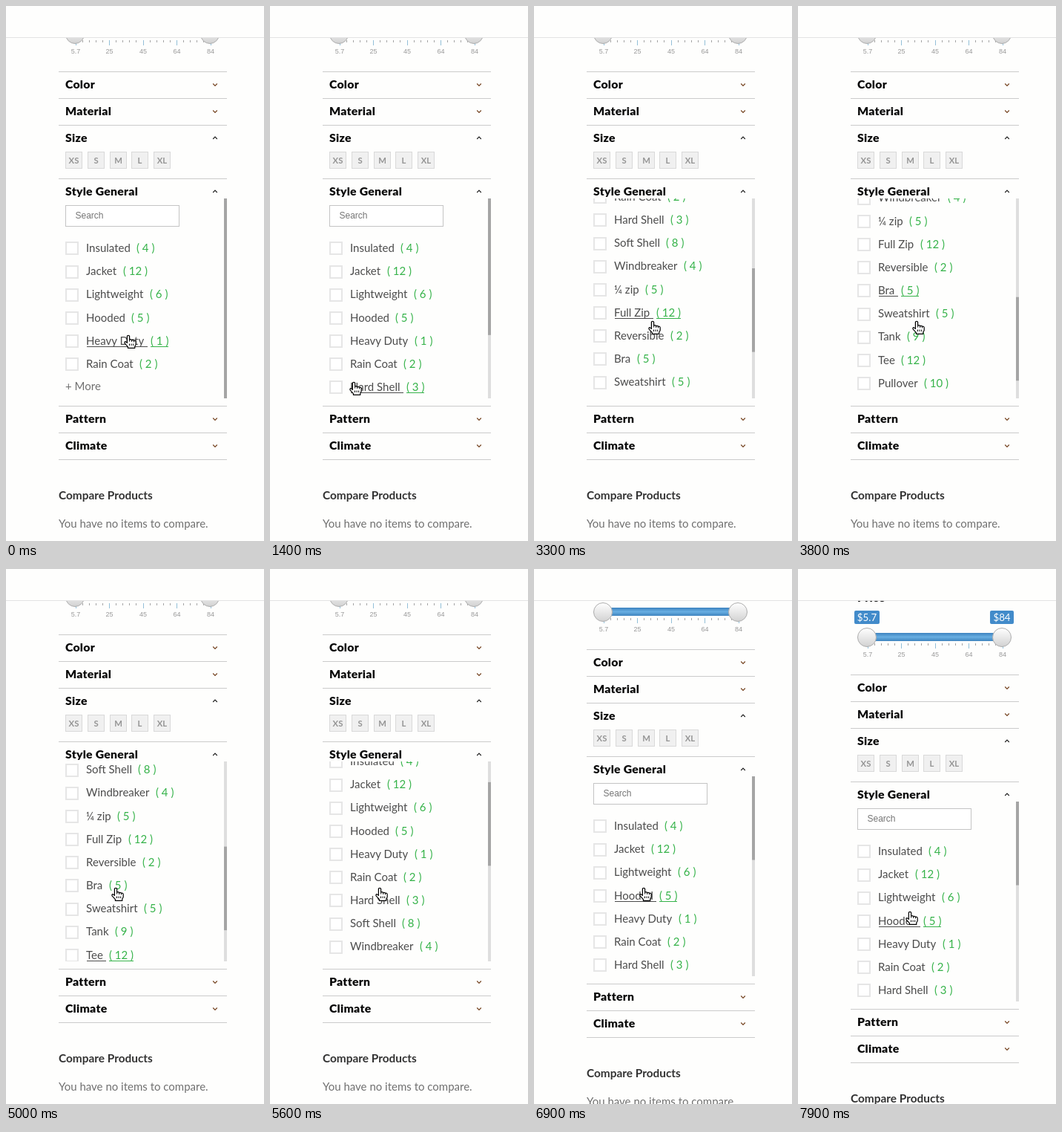
Write an HTML page that moves like this. It is 348 by 720 pixels and loops after 8000 ms.

```html
<!DOCTYPE html>
<html lang="en">
<head>
<meta charset="utf-8">
<title>Product filter</title>
<style>
  html, body { margin: 0; width: 100%; height: 100%; overflow: hidden; background: #fefefd; }
  svg { display: block; width: 348px; height: 720px; }
  text { font-family: Lato, "Open Sans", sans-serif; font-size: 15px; white-space: pre; }
  .head { font-size: 15.8px; font-weight: 900; letter-spacing: .25px; fill: #0a0a0a; }
  .sub { font-size: 15.4px; font-weight: 700; fill: #333; }
  .item { fill: #4c4c4c; }
  .count { fill: #36b34a; }
  .soft { fill: #707070; }
  .size { font-size: 11.3px; font-weight: 700; fill: #949494; text-anchor: middle; }
  .tick { font: 9px "Liberation Sans", Arial, sans-serif; fill: #999; text-anchor: middle; }
  .hint { font: 12px "Liberation Sans", Arial, sans-serif; fill: #757575; }
  .price { font-size: 13.3px; fill: #fff; text-anchor: middle; }
</style>
</head>
<body>
<svg viewBox="0 0 348 720" xmlns="http://www.w3.org/2000/svg">
  <defs>
    <clipPath id="panel"><rect x="71" y="259" width="222" height="269"/></clipPath>
    <linearGradient id="bar" x2="0" y2="1">
      <stop offset="0" stop-color="#3d82bf"/>
      <stop offset=".5" stop-color="#68aee2"/>
      <stop offset="1" stop-color="#3f84be"/>
    </linearGradient>
    <linearGradient id="knob" x2="0" y2="1">
      <stop offset="0" stop-color="#fff"/>
      <stop offset="1" stop-color="#d2d2d2"/>
    </linearGradient>
  </defs>
  <g id="page">
    <g id="frame"></g>
    <g clip-path="url(#panel)"><g id="list"></g></g>
    <rect x="294" y="259" width="4" height="269" fill="#dedede"/>
    <rect id="thumb" x="294" width="4" fill="#a5a5a5"/>
  </g>
  <rect width="348" height="42" fill="#fefefd"/>
  <rect y="42" width="348" height="1" fill="#e3e3e3"/>
  <g id="cursor" stroke="#000" stroke-linejoin="round">
    <g id="hand">
      <path fill="#fff" stroke-width="1.2" d="M-1.6 1.5Q-1.6 .4 0 .4T1.6 1.5V6Q3.4 5.2 4.6 6.6 6.4 5.8 7.4 7.2 10.2 6.7 10.2 9.2V12.5L8.8 15V17.3H-.6V15.6L-4.9 10.8Q-5.6 8.8-3.8 8.6L-1.6 10.4Z"/>
      <path fill="none" d="M1.7 6V8.6M4.7 6.8V9M7.5 7.4V9.4M1.5 11.5V14M4.1 11.5V14M6.7 11.5V14"/>
    </g>
    <path id="arrow" transform="translate(-5 4)" fill="#fff" stroke-width="1.3"
      d="M.5 .8V15.6L4 12.4 6.4 17.9 8.9 16.8 6.6 11.5H11.2Z"/>
  </g>
</svg>
<script>
const LOOP = 8000, STEP = 100, HOVER_STEP = 400;
const TOP = 259, VIEW = 269, FULL = 643, ROW = 326, PITCH = 31.17;
const LEFT = 108, GAP = 8.5, SHORT = 6, OPEN_AT = 1400;

const ITEMS = [
  ['Insulated', 4], ['Jacket', 12], ['Lightweight', 6], ['Hooded', 5], ['Heavy Duty', 1],
  ['Rain Coat', 2], ['Hard Shell', 3], ['Soft Shell', 8], ['Windbreaker', 4], ['¼ zip', 5],
  ['Full Zip', 12], ['Reversible', 2], ['Bra', 5], ['Sweatshirt', 5], ['Tank', 9],
  ['Tee', 12], ['Pullover', 10], ['Vest', 3]
];

// cursor strokes: from, to, x, y at the end
const STROKES = [
  [0, 350, 140, 646], [350, 700, 113, 506], [1800, 2200, 160, 424],
  [4400, 4700, 148, 429], [7000, 7300, 152, 442], [7400, 7900, 151, 461]
];

const $ = id => document.getElementById(id);

function add(parent, tag, attrs, text) {
  const el = document.createElementNS('http://www.w3.org/2000/svg', tag);
  for (const k in attrs) el.setAttribute(k, attrs[k]);
  if (text !== undefined) el.textContent = text;
  parent.appendChild(el);
  return el;
}
const rect = (p, x, y, width, height, fill, more) =>
  add(p, 'rect', { x, y, width, height, fill, ...more });
const label = (p, x, y, cls, text) => add(p, 'text', { x, y, class: cls }, text);
const box = (p, x, y, w, h, fill, stroke, line) =>
  rect(p, x + line / 2, y + line / 2, w - line, h - line, fill, { stroke, 'stroke-width': line });
const move = (el, x, y) => el.setAttribute('transform', `translate(${Math.round(x)} ${Math.round(y)})`);
const show = (el, on) => el.setAttribute('display', on ? 'inline' : 'none');
const width = el => el.getComputedTextLength();

// 0 to 1 between two times; a larger slow brakes more towards the end
function glide(t, from, to, slow = 0) {
  const u = Math.min(1, Math.max(0, (t - from) / (to - from)));
  return u * (1 + slow * (1 - u));
}

const pageShift = t => 20 * glide(t, 6285, 6600) + 34 * glide(t, 7450, 7900);
const scroll = t => (FULL - VIEW) * (glide(t, 2343, 4166, .305) - glide(t, 4800, 6100, .873));
const content = t => VIEW + (FULL - VIEW) * glide(t, 1300, 1600);
const isOpen = t => t >= OPEN_AT;
const isArrow = t => (t >= 200 && t < 600) || (t >= 2100 && t < 2500);

function cursor(t) {
  return STROKES.reduce(([x, y], [from, to, x2, y2]) => {
    const f = glide(t, from, to);
    return [x + (x2 - x) * f, y + (y2 - y) * f];
  }, [165, 443]);
}

// the hovered row is only refreshed now and then, so it lags behind the scrolling
function hovered(t) {
  const at = Math.floor(t / HOVER_STEP) * HOVER_STEP;
  const y = cursor(at)[1] - pageShift(at);
  if (y > TOP + VIEW) return -1;
  const pos = (y + scroll(at) - ROW) / PITCH, i = Math.round(pos);
  return Math.abs(pos - i) * PITCH < 10.8 ? i : -1;
}

function buildSlider(p) {
  label(p, 80, -10, 'head', 'Price');
  rect(p, 93, 32, 182, 11, 'url(#bar)');
  for (let i = 0; i <= 20; i++) {
    const major = i % 5 === 0;
    rect(p, Math.round(93.5 + i * 9.1), 46, 1, major ? 7 : 3, major ? '#93bfd8' : '#a5a5a5');
  }
  ['5.7', '25', '45', '64', '84'].forEach((s, i) => label(p, 94 + i * 45.5, 64, 'tick', s));
  [[93, '$5.7', 34], [275, '$84', 32]].forEach(([x, s, w]) => {
    rect(p, x - w / 2, 2, w, 18, '#428bca', { rx: 2 });
    label(p, x, 16, 'price', s);
    add(p, 'circle', { cx: x, cy: 38, r: 12.5, fill: 'url(#knob)', stroke: '#adadad' });
  });
}

function buildFrame(p) {
  buildSlider(p);
  let y = 88;
  const rule = () => rect(p, 71, y, 227, 1, '#cbcbcb');
  // title, height of the open body
  [['Color', 0], ['Material', 0], ['Size', 36], ['Style General', 270],
    ['Pattern', 0], ['Climate', 0]].forEach(([title, body]) => {
    rule();
    label(p, 80, y + 23, 'head', title);
    add(p, 'path', {
      d: body ? `M279.2 ${y + 19}l2.8-2.8 2.8 2.8` : `M279.2 ${y + 16.5}l2.8 2.8 2.8-2.8`,
      fill: 'none', stroke: body ? '#222' : '#74421f', 'stroke-width': 1.2
    });
    y += 36 + body;
  });
  rule();
  ['XS', 'S', 'M', 'L', 'XL'].forEach((s, i) => {
    const x = Math.round(80 + i * 29.75);
    box(p, x, 196, 23, 23, '#f0f0f0', '#d9d9d9', 1);
    label(p, x + 11.5, 211.5, 'size', s);
  });
  label(p, 71, 664, 'sub', 'Compare Products');
  label(p, 71, 702, 'soft', 'You have no items to compare.');
}

function buildRow(p, [name, n], i) {
  const g = add(p, 'g', {}), y = Math.round(ROW + i * PITCH);
  box(g, 80, Math.round(ROW + .4 + i * PITCH) - 9, 18, 18, '#fff', '#e6e6e6', 2);
  const text = label(g, LEFT, y + 5, 'item', name);
  const x = Math.round(LEFT + width(text) + GAP);
  const count = label(g, x, y + 5, 'count', `( ${n} )`);
  const line = add(g, 'g', {});
  rect(line, LEFT + 1, y + 7, x - LEFT - 5, 1, '#4c4c4c');
  rect(line, x, y + 7, Math.round(width(count)), 1, '#36b34a');
  return { g, line };
}

function buildList(p) {
  box(p, 80, 268, 154, 29, '#fff', '#c4c4c4', 1);
  label(p, 93.5, 286, 'hint', 'Search');
  const rows = ITEMS.map((item, i) => buildRow(p, item, i));
  const linkAt = n => Math.round(ROW + n * PITCH + 4);
  return {
    rows,
    more: label(p, 80, linkAt(SHORT), 'soft', '+ More'),
    less: label(p, 80, linkAt(ITEMS.length), 'soft', '- Less')
  };
}

buildFrame($('frame'));
const list = buildList($('list'));

function draw(t) {
  const s = scroll(t), scale = VIEW / content(t), open = isOpen(t), hover = hovered(t);
  move($('page'), 0, pageShift(t));
  move($('list'), 0, -s);
  move($('cursor'), ...cursor(t));
  show($('arrow'), isArrow(t));
  show($('hand'), !isArrow(t));
  $('thumb').setAttribute('y', TOP + s * scale);
  $('thumb').setAttribute('height', VIEW * scale);
  list.rows.forEach((row, i) => {
    show(row.g, open || i < SHORT);
    show(row.line, i === hover);
  });
  show(list.more, !open);
  show(list.less, open);
}

const start = performance.now();
function tick() {
  const t = (performance.now() - start) % LOOP;
  draw(Math.floor(t / STEP) * STEP);
  requestAnimationFrame(tick);
}
tick();
</script>
</body>
</html>
```
